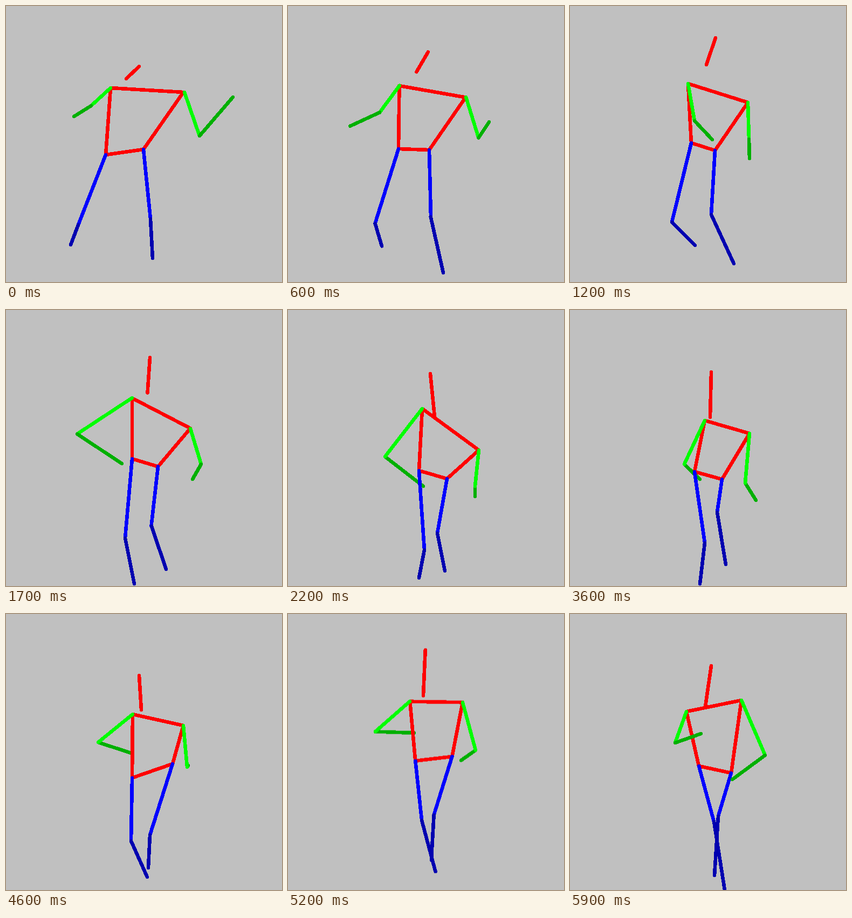
Animation of 512x512 px, one loop 6000 ms. Source, as an HTML page without scripts:

```html
<!DOCTYPE html>
<html lang="en">
<head>
<meta charset="utf-8">
<title>Stick figure</title>
<style>
html, body { margin: 0; width: 100%; height: 100%; overflow: hidden; background: #c0c0c0; }
svg { display: block; width: 100vw; height: 100vh; }
path { fill: none; stroke-width: 6.6; stroke-linecap: round; stroke-linejoin: round; shape-rendering: crispEdges; }
path, .figure { animation: 6s step-end -1ms infinite; }
.torso, .head { stroke: #f00; }
.upper-arms { stroke: #0f0; }
.forearms { stroke: #00b000; }
.thighs { stroke: #00f; }
.shins { stroke: #0000b0; }
.figure { animation-name: bob; }
.torso { animation-name: torso; }
.head { animation-name: head; }
.upper-arms { animation-name: upper-arms; }
.forearms { animation-name: forearms; }
.forearms.front { animation-name: forearms, in-front; }
.thighs { animation-name: thighs; }
.shins { animation-name: shins; }

/* Each pose moves to the next in 100 ms ticks. */
@keyframes bob {
  0%, 100% { transform: translateY(0); }
  10% { transform: translateY(0); animation-timing-function: steps(4); }
  16.66% { transform: translateY(-16px); animation-timing-function: steps(2); }
  20% { transform: translateY(0); }
  36.66% { transform: translateY(0); animation-timing-function: steps(2); }
  40% { transform: translateY(-18px); animation-timing-function: steps(6); }
  50% { transform: translateY(0); }
  60% { transform: translateY(0); animation-timing-function: steps(4); }
  66.66% { transform: translateY(-30px); animation-timing-function: steps(6); }
  76.66% { transform: translateY(0); animation-timing-function: steps(7); }
  88.33% { transform: translateY(-25px); animation-timing-function: steps(6); }
  98.33% { transform: translateY(0); }
}
@keyframes torso {
  0%, 100% { d: path("M194 152L329 160L255 266L185 276Z"); animation-timing-function: steps(12); }
  20% { d: path("M219 144L330 179L269 268L225 254Z"); animation-timing-function: steps(10); }
  36.66% { d: path("M249 183L354 260L295 313L243 298Z"); animation-timing-function: steps(8); }
  50% { d: path("M206 181L325 184L313 276L232 319Z"); animation-timing-function: steps(6); }
  60% { d: path("M250 205L333 229L282 314L231 300Z"); animation-timing-function: steps(10); }
  76.66% { d: path("M235 186L329 207L309 278L234 304Z"); animation-timing-function: steps(13); }
  98.33% { d: path("M216 181L318 160L299 295L239 282Z"); }
}
@keyframes head {
  0%, 100% { d: path("M247 112L223 135"); animation-timing-function: steps(7); }
  11.66% { d: path("M262 81L241 120"); animation-timing-function: steps(3); }
  16.66% { d: path("M268 48L250 105"); animation-timing-function: steps(2); }
  20% { d: path("M270 59L253 109"); animation-timing-function: steps(10); }
  36.66% { d: path("M264 118L272 198"); animation-timing-function: steps(2); }
  40% { d: path("M262 103L266 182"); animation-timing-function: steps(6); }
  50% { d: path("M259 109L250 153"); animation-timing-function: steps(6); }
  60% { d: path("M262 115L260 199"); animation-timing-function: steps(4); }
  66.66% { d: path("M257 96L257 182"); animation-timing-function: steps(6); }
  76.66% { d: path("M247 114L251 178"); animation-timing-function: steps(7); }
  88.33% { d: path("M256 84L251 172"); animation-timing-function: steps(6); }
  98.33% { d: path("M262 96L251 172"); }
}
@keyframes upper-arms {
  0%, 100% { d: path("M194 152L158 185M331 160L359 241"); animation-timing-function: steps(3); }
  5% { d: path("M200 150L140 190M331 165L364 243"); animation-timing-function: steps(4); }
  11.66% { d: path("M209 147L180 200M330 171L350 245"); animation-timing-function: steps(5); }
  20% { d: path("M219 144L231 213M330 179L332 247"); animation-timing-function: steps(5); }
  28.33% { d: path("M234 163L132 230M342 220L362 286"); animation-timing-function: steps(5); }
  36.66% { d: path("M249 183L180 272M354 260L347 327"); animation-timing-function: steps(5); }
  45% { d: path("M222 182L194 256M336 213L388 270"); animation-timing-function: steps(3); }
  50% { d: path("M206 181L203 247M325 184L391 241"); animation-timing-function: steps(5); }
  58.33% { d: path("M243 201L180 270M332 222L336 308"); }
  60% { d: path("M250 205L212 286M333 229L325 321"); animation-timing-function: steps(10); }
  76.66% { d: path("M235 186L171 238M329 207L336 284"); animation-timing-function: steps(2); }
  80% { d: path("M232 185L138 240M327 200L340 281"); animation-timing-function: steps(8); }
  93.33% { d: path("M220 182L186 239M321 171L356 267"); animation-timing-function: steps(3); }
  98.33% { d: path("M216 181L195 239M318 160L362 262"); }
}
@keyframes forearms {
  0%, 100% { d: path("M158 185L126 205M359 241L421 169"); animation-timing-function: steps(3); }
  5% { d: path("M140 190L80 216M364 243L427 186"); animation-timing-function: steps(4); }
  11.66% { d: path("M180 200L127 225M350 245L355 225"); animation-timing-function: steps(5); }
  20% { d: path("M231 213L264 248M332 247L333 283"); animation-timing-function: steps(5); }
  28.33% { d: path("M132 230L215 285M362 286L346 314"); animation-timing-function: steps(5); }
  36.66% { d: path("M180 272L251 327M347 327L347 346"); animation-timing-function: steps(5); }
  45% { d: path("M194 256L235 290M388 270L333 257"); animation-timing-function: steps(3); }
  50% { d: path("M203 247L226 268M391 241L324 203"); animation-timing-function: steps(5); }
  58.33% { d: path("M180 270L225 300M336 308L342 328"); }
  60% { d: path("M212 286L241 314M325 321L345 353"); animation-timing-function: steps(10); }
  76.66% { d: path("M171 238L232 258M336 284L338 281"); animation-timing-function: steps(2); }
  80% { d: path("M138 240L228 254M340 281L332 285"); animation-timing-function: steps(8); }
  93.33% { d: path("M186 239L240 230M356 267L310 301"); animation-timing-function: steps(3); }
  98.33% { d: path("M195 239L243 222M362 262L301 307"); }
}
@keyframes in-front {
  0%, 43.33%, 88.33%, 100% { visibility: visible; }
  30%, 55% { visibility: hidden; }
}
@keyframes thighs {
  0%, 100% { d: path("M185 276L134 406M255 266L268 395"); animation-timing-function: steps(12); }
  20% { d: path("M225 254L189 401M269 268L262 387"); animation-timing-function: steps(10); }
  36.66% { d: path("M243 298L253 445M295 313L277 414"); animation-timing-function: steps(8); }
  50% { d: path("M232 319L240 429M313 276L272 386"); animation-timing-function: steps(6); }
  60% { d: path("M231 300L250 432M282 314L273 375"); animation-timing-function: steps(10); }
  76.66% { d: path("M234 304L232 421M309 278L267 410"); animation-timing-function: steps(13); }
  98.33% { d: path("M239 282L267 385M299 295L275 375"); }
}
@keyframes shins {
  0%, 100% { d: path("M134 406L120 443M268 395L272 468"); animation-timing-function: steps(3); }
  5% { d: path("M148 405L145 446M266 393L280 503"); animation-timing-function: steps(9); }
  20% { d: path("M189 401L232 444M262 387L304 478"); animation-timing-function: steps(5); }
  28.33% { d: path("M221 423L238 508M270 401L297 481"); animation-timing-function: steps(5); }
  36.66% { d: path("M253 445L243 497M277 414L291 484"); animation-timing-function: steps(8); }
  50% { d: path("M240 429L263 511M272 386L280 487"); animation-timing-function: steps(6); }
  60% { d: path("M250 432L241 508M273 375L289 472"); animation-timing-function: steps(10); }
  76.66% { d: path("M232 421L262 488M267 410L264 471"); animation-timing-function: steps(13); }
  98.33% { d: path("M267 385L287 512M275 375L268 485"); }
}
</style>
</head>
<body>
<svg viewBox="0 0 512 512">
  <g class="figure">
    <path class="forearms"/>
    <path class="torso"/>
    <path class="head"/>
    <path class="upper-arms"/>
    <path class="thighs"/>
    <path class="shins"/>
    <path class="forearms front"/>
  </g>
</svg>
</body>
</html>
```
